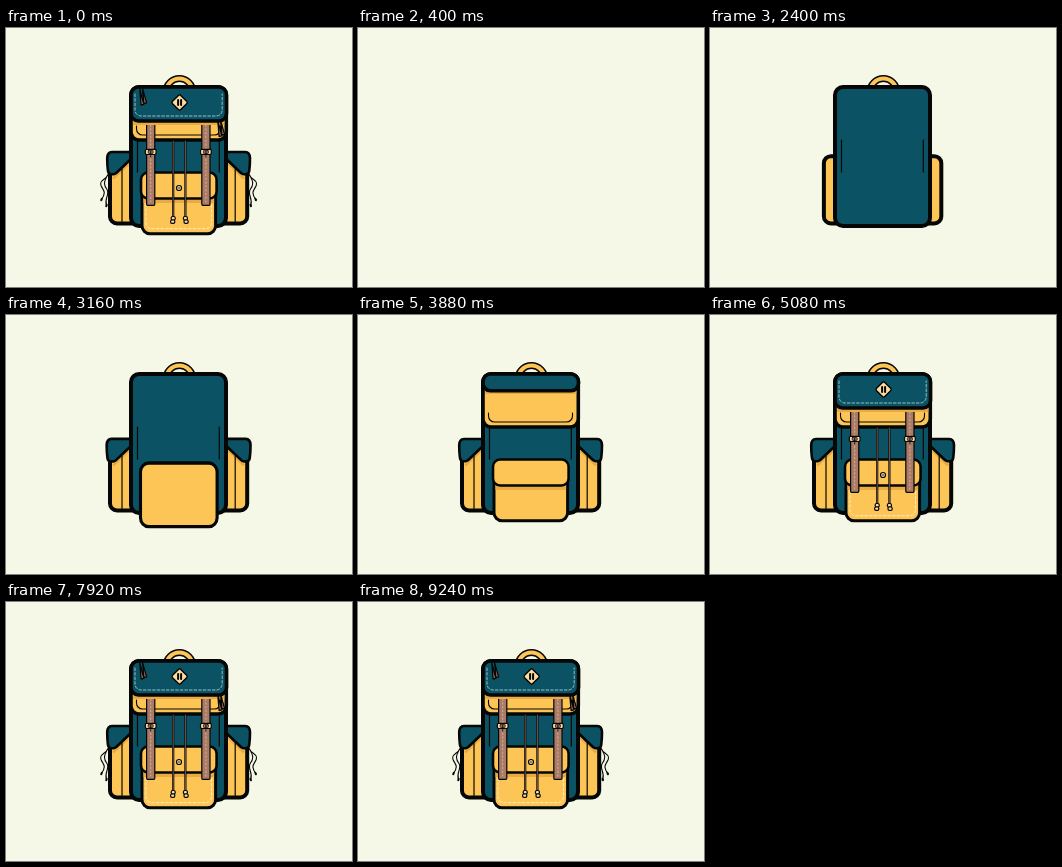
Recreate the animation shown at these times as an HTML page with a canvas. Size 346 by 259 pixels, loop 9320 ms.

```html
<!DOCTYPE html>
<html lang="en">
<head>
<meta charset="utf-8">
<title>Backpack</title>
<style>
html, body { margin: 0; width: 100%; height: 100%; overflow: hidden; background: #f5f8e6; }
canvas { display: block; width: 346px; height: 259px; }
</style>
</head>
<body>
<canvas id="stage"></canvas>
<script>
const W = 346, H = 259, LOOP = 9320, AXIS = 345.2;
const INK = '#050606', TEAL = '#0b5265', YELLOW = '#fcc556', SHADE = '#e9a943',
      BROWN = '#a97a65', CREAM = '#fbdda0', PAPER = '#f5f8e6';
const canvas = document.getElementById('stage');
const ratio = window.devicePixelRatio || 1;
canvas.width = W * ratio;
canvas.height = H * ratio;
const c = canvas.getContext('2d');

const clamp = x => Math.max(0, Math.min(1, x));
const part = (t, start, dur) => clamp((t - start) / dur);
const easeOut = p => 1 - (1 - p) ** 3;
const back = (p, s = 1.7) => p <= 0 ? 0 : 1 + (s + 1) * (p - 1) ** 3 + s * (p - 1) ** 2;

function paint(fill, width, stroke = INK) {
  if (fill) { c.fillStyle = fill; c.fill(); }
  if (width) { c.lineWidth = width; c.strokeStyle = stroke; c.stroke(); }
}

function box(x, y, w, h, r, fill, width) {
  if (w <= 0 || h <= 0) return;
  c.beginPath();
  c.roundRect(x, y, w, h, Math.min(r, w / 2, h / 2));
  paint(fill, width);
}

function line(points, width, color = INK) {
  c.beginPath();
  points.forEach(([x, y]) => c.lineTo(x, y));
  paint(null, width, color);
}

function group(draw) {
  c.save();
  draw();
  c.restore();
}

function scaleAt(x, y, sx, sy, draw) {
  if (sx <= 0 || sy <= 0) return;
  group(() => {
    c.translate(x, y);
    c.scale(sx, sy);
    c.translate(-x, -y);
    draw();
  });
}

function bothSides(draw, axis = AXIS) {
  draw();
  group(() => {
    c.translate(axis, 0);
    c.scale(-1, 1);
    draw();
  });
}

// U-shaped line along the lower edge of a panel
function cup(left, right, top, bottom, r) {
  c.beginPath();
  c.moveTo(left, top);
  c.arcTo(left, bottom, left + r, bottom, r);
  c.arcTo(right, bottom, right, bottom - r, r);
  c.lineTo(right, top);
}

function stitches(left, right, top, bottom, color, p) {
  if (p <= 0) return;
  group(() => {
    c.beginPath();
    c.rect(left - 2, top - 2, (right - left + 4) * p, bottom - top + 4);
    c.clip();
    c.setLineDash([2.6, 2]);
    cup(left, right, top, bottom, 6);
    paint(null, 0.9, color);
  });
}

function handle(t) {
  const p = part(t, 1860, 460);
  if (p <= 0) return;
  group(() => {
    c.translate(0, 20 * (1 - back(p, 2.4)));
    c.beginPath();
    c.arc(173.4, 64, 13.4, Math.PI, 0);
    paint(null, 7, INK);
    paint(null, 4, YELLOW);
  });
}

function sidePocket(t) {
  const p = part(t, 2350, 450);
  if (p <= 0) return;
  const cap = part(t, 2800, 400);
  group(() => {
    c.translate(23 * (1 - back(p, 3)), 0);
    box(104, 128.2, 42, 67.3, 7, YELLOW, 4);
    if (cap > 0) line([[108, 149.5], [126, 132.5]], 3 * cap, SHADE);
    line([[116, 141], [116, 193.5]], 1.2);
  });
  scaleAt(125, 130, back(cap, 2.6), back(cap), () => {
    c.beginPath();
    c.moveTo(106, 124);
    c.lineTo(130, 124);
    c.lineTo(126, 130);
    c.lineTo(110, 145.2);
    c.quadraticCurveTo(109, 146.2, 107.5, 146.2);
    c.lineTo(105, 146.2);
    c.quadraticCurveTo(102.5, 146, 102, 143);
    c.quadraticCurveTo(101.2, 138, 101.2, 130);
    c.quadraticCurveTo(101.4, 124.2, 106, 124);
    c.closePath();
    paint(TEAL, 2.6);
  });
}

function body(t) {
  const p = easeOut(part(t, 880, 560));
  scaleAt(172.5, 128.5, p, p, () => box(125, 59, 95, 139, 8, TEAL, 4));
  const h = 32 * easeOut(part(t, 1440, 320));
  if (h > 0) bothSides(() => line([[131.5, 128 - h / 2], [131.5, 128 + h / 2]], 1.2), 344.8);
}

function frontPocket(t) {
  const p = back(part(t, 3000, 400), 2.2);
  scaleAt(172.8, 148, 0.6 + 0.4 * p, p, () => {
    box(136, 148, 73.6, 57.7, 8, YELLOW, 3);
    stitches(140, 205.5, 176, 200.7, '#fff0c8', easeOut(part(t, 4450, 350)));
  });
  const q = back(part(t, 3300, 350));
  scaleAt(172.8, 145, q, q, () => {
    c.fillStyle = SHADE;
    c.fillRect(137.5, 170, 70.6, 5 * part(t, 3500, 200));
    box(135, 144.5, 75.6, 26, 7, YELLOW, 2.6);
  });
  const r = back(part(t, 4500, 300));
  scaleAt(173, 160, r, r, () => {
    c.beginPath();
    c.arc(173, 160, 2.5, 0, 7);
    paint(CREAM, 1.2);
    c.beginPath();
    c.arc(173, 160, 0.8, 0, 7);
    paint(INK);
  });
}

function upperPanel(t) {
  const p = back(part(t, 3400, 350), 1.2);
  if (p <= 0) return;
  box(125, 59, 95.3, 53 * p, 8, YELLOW, 3.6);
  const q = part(t, 3600, 200);
  if (q > 0) {
    c.globalAlpha = q;
    cup(130.5, 214.5, 98, 107, 6);
    paint(null, 1.1);
    c.globalAlpha = 1;
  }
}

function strap(t) {
  const h = 86 * easeOut(part(t, 4350, 500));
  if (h <= 0) return;
  box(140.6, 91.3, 8.2, h, 1, BROWN, 1.2);
  group(() => {
    c.setLineDash([1.6, 2.2]);
    line([[144.7, 93], [144.7, 91 + Math.max(2, h - 3)]], 0.8, '#dfbaa0');
  });
  const p = back(part(t, 4700, 280));
  scaleAt(144.7, 124, p, p, () => {
    box(139.3, 121.3, 10.8, 5.2, 1.4, CREAM, 1.2);
    box(142.2, 122.6, 5, 2.8, 0.5, BROWN, 0.7);
    line([[144.7, 123], [144.7, 129]], 0.9);
  });
}

function drawCords(t) {
  const len = 78 * easeOut(part(t, 4500, 450));
  if (len <= 0) return;
  [[167.2, -1], [179.4, 1]].forEach(([x, side]) => {
    line([[x, 112], [x, 112 + len]], 2.2);
    line([[x, 113], [x, 112 + len]], 0.7, BROWN);
    const p = back(part(t, 4780, 260));
    scaleAt(x, 190, p, p, () => {
      box(x - 2, 188.5, 4, 3.6, 1.4, CREAM, 1.2);
      box(x - 2 + side * 0.6, 192, 4.2, 3.4, 1.4, CREAM, 1.2);
    });
  });
}

function patch(t) {
  const p = back(part(t, 4150, 360), 2);
  scaleAt(173.6, 74.5, p, p, () => {
    group(() => {
      c.translate(173.6, 74.5);
      c.rotate(Math.PI / 4);
      box(-5.8, -5.8, 11.6, 11.6, 1.6, CREAM, 1.4);
    });
    line([[172.1, 72], [172.1, 77]], 2);
    line([[175.1, 72], [175.1, 77]], 2);
  });
}

function topFlap(t) {
  const p = back(part(t, 3805, 520), 1.1);
  if (p <= 0) return;
  const h = 34 * p;
  c.fillStyle = SHADE;
  c.fillRect(127, 59 + h, 91.3, 4 * part(t, 3805, 100));
  box(125, 59, 95.5, h, 7.5, TEAL, 3.6);
  stitches(129, 216.2, 66, 88, '#a9cbc8', easeOut(part(t, 4250, 400)));
  patch(t);
}

// damped sway of anything that hangs
const sway = (t, start, size) => t < start ? 0 :
  size * Math.exp((start - t) / 330) * Math.sin((t - start) / 95);

function tag(x, top, length) {
  c.beginPath();
  c.moveTo(x, top);
  c.lineTo(x + 1.3, length);
  c.lineTo(x + 4, length - 0.6);
  c.closePath();
  paint(BROWN, 1.3);
}

function puller(t, x, y, start) {
  const p = back(part(t, start, 300));
  scaleAt(x, y, p, p, () => {
    c.translate(x, y);
    c.rotate(sway(t, start, 0.5));
    tag(-1.2, 0, 16);
    tag(1.6, 0, 14.5);
  });
}

function sideCord(t, start) {
  const p = easeOut(part(t, start, 320));
  if (p <= 0) return;
  group(() => {
    c.translate(102, 146.5);
    c.rotate(sway(t, start, 0.35));
    c.scale(1, p);
    c.beginPath();
    c.moveTo(0, 0);
    c.bezierCurveTo(-2, 6, -9, 5, -7, 11);
    c.bezierCurveTo(-5, 16, -1, 17, -6.5, 25);
    c.moveTo(0, 0);
    c.bezierCurveTo(-5, 8, -4, 11, -1, 15);
    c.bezierCurveTo(2, 20, -4, 24, -1.5, 31);
    paint(null, 1.1);
    [[-6.5, 25], [-1.5, 31]].forEach(([x, y]) => {
      c.beginPath();
      c.ellipse(x, y, 1.1, 1.9, 0.3, 0, 7);
      paint(INK);
    });
  });
}

function drawBag(t) {
  if (t <= 880) return;
  handle(t);
  bothSides(() => sidePocket(t));
  body(t);
  frontPocket(t);
  upperPanel(t);
  drawCords(t);
  bothSides(() => strap(t), 344.6);
  topFlap(t);
  puller(t, 135, 61, 5120);
  puller(t, 213, 92.5, 5250);
  sideCord(t, 5350);
  group(() => {
    c.translate(AXIS, 0);
    c.scale(-1, 1);
    sideCord(t, 5660);
  });
}

// the bag is unpacked quickly in reverse, then rebuilt
function buildTime(t) {
  if (t < 80) return LOOP;
  if (t < 400) return 6100 - 5220 * (t - 40) / 360;
  return t;
}

function frame(now) {
  c.setTransform(ratio, 0, 0, ratio, 0, 0);
  c.fillStyle = PAPER;
  c.fillRect(0, 0, W, H);
  c.lineCap = 'round';
  c.lineJoin = 'round';
  drawBag(buildTime((now - begin) % LOOP));
  requestAnimationFrame(() => frame(performance.now()));
}

const begin = performance.now();
frame(begin);
</script>
</body>
</html>
```
